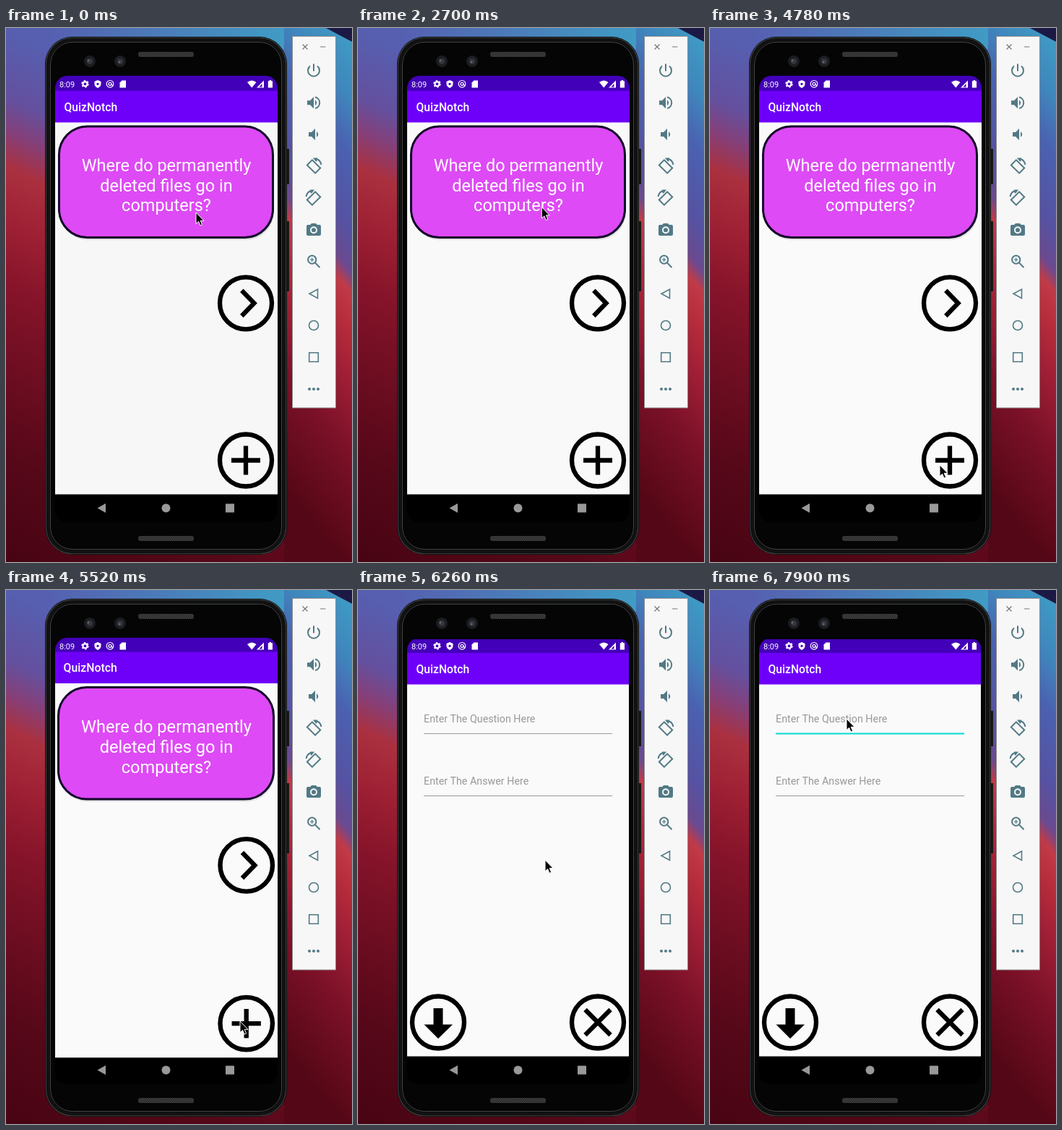
An HTML page for the animation above (8 s loop, 479x738 px).

```html
<!DOCTYPE html>
<html lang="en">
<head>
<meta charset="utf-8">
<title>Quiz app demo</title>
<style>
  html, body { margin: 0; width: 100%; height: 100%; overflow: hidden; background: #000; }
  svg { display: block; width: 479px; height: 738px; font-family: Roboto, sans-serif; }
  .paper { fill: var(--paper); }
  .ring { fill: none; stroke: #000; stroke-width: 6.3; }
  .line { fill: none; stroke: #527985; stroke-width: 2; }
  .thin { stroke-width: 1.6; }
  .solid { fill: #527985; }
  .hint { font-size: 14.3px; fill: #989898; }
  .question { font-size: 23.5px; fill: #fff; text-anchor: middle; }
</style>
</head>
<body>
<svg viewBox="0 0 479 738">
  <defs>
    <linearGradient id="left" gradientUnits="userSpaceOnUse" x1="0" y1="0" x2="0" y2="738" gradientTransform="skewY(25)">
      <stop stop-color="#565fb0"/><stop offset=".13" stop-color="#64509e"/>
      <stop offset=".19" stop-color="#84407a"/><stop offset=".26" stop-color="#aa303f"/>
      <stop offset=".36" stop-color="#9e2034"/><stop offset=".48" stop-color="#86142a"/>
      <stop offset=".62" stop-color="#700e22"/><stop offset=".8" stop-color="#560819"/>
      <stop offset="1" stop-color="#480413"/>
    </linearGradient>
    <linearGradient id="right" gradientUnits="userSpaceOnUse" x1="0" y1="0" x2="0" y2="738" gradientTransform="translate(468 0) skewY(50)">
      <stop stop-color="#3f9cc4"/><stop offset=".12" stop-color="#3f86bd"/>
      <stop offset=".22" stop-color="#4a62b0"/><stop offset=".36" stop-color="#5652a2"/>
      <stop offset=".44" stop-color="#6a4a90"/><stop offset=".48" stop-color="#c03a48"/>
      <stop offset=".54" stop-color="#b82e3c"/><stop offset=".64" stop-color="#a02036"/>
      <stop offset=".78" stop-color="#7c1128"/><stop offset="1" stop-color="#540716"/>
    </linearGradient>
    <linearGradient id="sky"><stop stop-color="#565fb0"/><stop offset="1" stop-color="#3f9cc4"/></linearGradient>
    <pattern id="mesh" width="3" height="4" patternUnits="userSpaceOnUse">
      <path fill="#2c2c2c" d="M0 0h3v4H0z"/><path stroke="#484848" d="M0 4 3 0"/>
    </pattern>
    <clipPath id="screen"><rect x="68" y="66" width="308" height="617" rx="17"/></clipPath>
    <g id="window">
      <path class="paper" d="M68 130H376V645H68z"/>
      <path fill="#4300b9" d="M68 66H376V87H68z"/>
      <path fill="#6e00fa" d="M68 87H376V130.5H68z"/>
      <path d="M68 644.5H376V684H68z"/>
      <text x="80.5" y="115" font-size="15.7" font-weight="500" fill="#fff">QuizNotch</text>
    </g>
  </defs>

  <path fill="url(#left)" d="M0 0H386V738H0z"/>
  <path fill="url(#sky)" d="M54 0H386V30H54z"/>
  <path fill="url(#right)" d="M385 0H479V738H385z"/>
  <path fill="#1c1a45" d="M443 0H479V19z"/>

  <!-- phone body -->
  <path fill="#181818" d="M387 167h5v49h-5zM387 267h5v97h-5z"/>
  <rect x="54" y="12" width="335" height="716" rx="38" fill="#050505"/>
  <g fill="none">
    <rect x="55.5" y="13.5" width="332" height="713" rx="36.5" stroke="#363939" stroke-width="1.6"/>
    <rect x="58.5" y="16.5" width="326" height="707" rx="34" stroke="#121212" stroke-width="4"/>
    <rect x="61.5" y="19.5" width="320" height="701" rx="31" stroke="#444747"/>
  </g>
  <g fill="url(#mesh)">
    <rect x="183" y="33" width="77" height="7" rx="3"/>
    <rect x="183" y="702" width="77" height="7" rx="3"/>
  </g>
  <g fill="#1b1d20">
    <circle cx="116" cy="46" r="8"/><circle cx="158" cy="46" r="8"/>
    <g fill="#33373d"><circle cx="116" cy="46" r="4"/><circle cx="158" cy="46" r="4"/></g>
    <g fill="#62666c"><circle cx="114" cy="45" r="1.5"/><circle cx="157" cy="47" r="1.5"/></g>
  </g>

  <!-- app windows -->
  <g clip-path="url(#screen)">
    <path d="M68 66H376V684H68z"/>
    <g id="cardPage">
      <use href="#window"/>
      <rect x="74" y="138" width="297" height="155" rx="39" opacity=".1"/>
      <rect x="73.5" y="136" width="296" height="153.5" rx="39" fill="#de4af5" stroke="#13062a" stroke-width="3"/>
      <g class="question">
        <text x="222" y="198">Where do permanently</text>
        <text x="222" y="225.7">deleted files go in</text>
        <text x="222" y="253.3">computers?</text>
      </g>
      <g class="ring">
        <circle cx="332" cy="380.3" r="36"/><path d="M326.3 362.7 343.5 380.3 326.3 398"/>
        <circle cx="332" cy="597.5" r="36"/><path d="M312 597.5H352M332 577.5V617.5"/>
      </g>
    </g>
    <g id="formPage">
      <use href="#window"/>
      <text class="hint" x="91" y="182.5">Enter The Question Here</text>
      <text class="hint" x="91" y="268.7">Enter The Answer Here</text>
      <path id="underline" d="M91 198.5H352"/>
      <path stroke="#999" d="M91 284.5H352"/>
      <path id="caret" stroke="#03dac5" stroke-width="1.5" d="M91.5 168V187"/>
      <g class="ring">
        <circle cx="111" cy="597.5" r="36"/><circle cx="332" cy="597.5" r="36"/>
        <path d="M314.5 580 349.5 615M349.5 580 314.5 615"/>
      </g>
      <path d="M104.5 578H117.5V600.5H131L111 620 91.5 600.5H104.5z"/>
    </g>
    <path id="bezel" d="M68 66H376V684H375V80Q375 68 363 68H80Q68 68 68 80z"/>
  </g>

  <!-- system bars -->
  <g fill="#fff">
    <text x="74" y="81.7" font-size="11">8:09</text>
    <circle cx="109.5" cy="77.3" r="3" fill="none" stroke="#fff" stroke-width="2.2"/>
    <circle cx="109.5" cy="77.3" r="4.6" fill="none" stroke="#fff" stroke-width="1.4" stroke-dasharray="2.4 2.42"/>
    <path d="M127 72 131.5 74V77.5C131.5 80 129.5 82 127 83 124.5 82 122.5 80 122.5 77.5V74z"/>
    <circle cx="127" cy="77.3" r="1.6" fill="#4300b9"/>
    <g fill="none" stroke="#fff" stroke-width="1.2">
      <circle cx="144" cy="77.3" r="4.8"/><circle cx="144" cy="77.3" r="2"/><path d="M146 77.3 148 81"/>
    </g>
    <path d="M160.5 72.5H166V82.5H157.5V75.5z"/>
    <path d="M334 75Q340.3 70 346.5 75L340.3 82.5zM357 72.5V82.5H347z"/>
    <path fill="#4300b9" d="M354.5 77V81.5H350.5z"/>
    <path d="M364.7 72H367V73.2H369V82.5H362.8V73.2H364.7z"/>
  </g>
  <g fill="#999">
    <path d="M138 657V670L126.5 663.5z"/><circle cx="221.5" cy="663.5" r="6"/><path d="M304 657.5h12v12h-12z"/>
  </g>

  <!-- side toolbar -->
  <rect x="396.5" y="11.5" width="60" height="513.5" fill="#f7f7f7" stroke="#8a8a8a"/>
  <path fill="none" stroke="#777" stroke-width="1.2" d="M410.5 22.5l7 7m0-7l-7 7M435 26h7.5"/>
  <g transform="translate(414 46.5)" class="line"><path d="M12 3V13M7 6A8 8 0 1 0 17 6"/></g>
  <g transform="translate(414 91.3)"><path class="solid" d="M3 9V15H7L12 20V4L7 9zM14 8Q18.5 12 14 16z"/><path class="line" d="M14 4.2A8 8 0 0 1 14 19.8"/></g>
  <g transform="translate(414 135)"><path class="solid" d="M5 9V15H9L14 20V4L9 9zM16 8Q20.5 12 16 16z"/></g>
  <g id="rotate" transform="translate(414 179)" class="line">
    <rect x="7" y="4.500" width="10" height="16" transform="rotate(-45 12 12.500)"/>
    <path d="M13 1.500Q21 2 22.500 10M17 1.500 13 1.500 16 5"/>
  </g>
  <use href="#rotate" transform="translate(852 44) scale(-1 1)"/>
  <g transform="translate(414 267)">
    <path class="solid" d="M9 3 7.2 5H4A2 2 0 0 0 2 7V18A2 2 0 0 0 4 20H20A2 2 0 0 0 22 18V7A2 2 0 0 0 20 5H16.8L15 3z"/>
    <circle cx="12" cy="12.3" r="4" fill="#527985" stroke="#f7f7f7" stroke-width="2"/>
  </g>
  <g transform="translate(414 310.5)" class="line"><circle cx="9.7" cy="9.7" r="5.6"/><path d="M14 14 20.5 20.5"/><path stroke-width="1.2" d="M7 9.7H12.4M9.7 7V12.4"/></g>
  <g class="line thin">
    <path d="M431.5 361V373.5L420 367.3z"/><circle cx="426" cy="411" r="6.5"/><path d="M419.7 448.7h12.6v12.6h-12.6z"/>
  </g>
  <g class="solid"><circle cx="420" cy="499" r="2"/><circle cx="426" cy="499" r="2"/><circle cx="432" cy="499" r="2"/></g>

  <path id="pointer" stroke="#fff" d="M0 0V15.5L3.6 12.3 6 18 8.6 16.9 6.2 11.3H11z"/>
</svg>
<script>
const LOOP = 8000, TICK = 148.9;
const OPEN_AT = 5498, OPEN_MS = 400, FOCUS = 49;

// Pointer rests and turns: tick, x, y
const PATH = [
  [0, 263, 255], [2, 264, 238], [3, 264, 238], [4, 261, 238], [11, 261, 238],
  [14, 261, 225], [17, 261, 225], [20, 235, 312], [24, 235, 312], [29, 337, 585],
  [32, 318, 604], [34, 324, 596], [39, 324, 596], [43, 247, 332], [44, 247, 332],
  [48, 189, 178], [54, 189, 178]
];

const $ = id => document.getElementById(id);
const clamp = v => Math.min(1, Math.max(0, v));
const show = (id, on) => $(id).setAttribute("display", on ? "inline" : "none");
const zoom = (id, s) =>
  $(id).setAttribute("transform", `translate(222 364) scale(${s}) translate(-222 -364)`);

function pointerAt(tick) {
  const i = Math.max(1, PATH.findIndex(key => key[0] >= tick));
  const [t0, x0, y0] = PATH[i - 1], [t1, x1, y1] = PATH[i];
  const p = (tick - t0) / (t1 - t0), eased = p * p * (3 - 2 * p);
  return [x0 + (x1 - x0) * eased, y0 + (y1 - y0) * eased];
}

function draw(time) {
  const tick = Math.floor(time % LOOP / TICK);
  const paper = tick < 16 ? "#f7f7f7" : tick < 22 ? "#f9f9f9" : "#fafafa";
  document.documentElement.style.setProperty("--paper", paper);

  // The form fades in quickly while both pages grow with a long ease-out
  const age = tick * TICK - OPEN_AT;
  const rest = (1 - clamp(age / OPEN_MS)) ** 5;
  const alpha = clamp((age - 35) / 50);
  show("cardPage", age < OPEN_MS);
  show("formPage", alpha > 0);
  show("bezel", alpha > 0);
  $("formPage").setAttribute("opacity", alpha);
  zoom("cardPage", 1.05 - 0.05 * rest);
  zoom("formPage", 1 - 0.15 * rest);

  const focused = tick >= FOCUS;
  $("underline").setAttribute("stroke", focused ? "#03dcd4" : "#999");
  $("underline").setAttribute("stroke-width", focused ? 2 : 1);
  show("caret", tick >= FOCUS + 2 && tick < FOCUS + 4);

  $("pointer").setAttribute("transform", `translate(${pointerAt(tick)})`);
  requestAnimationFrame(draw);
}
requestAnimationFrame(draw);
</script>
</body>
</html>
```
